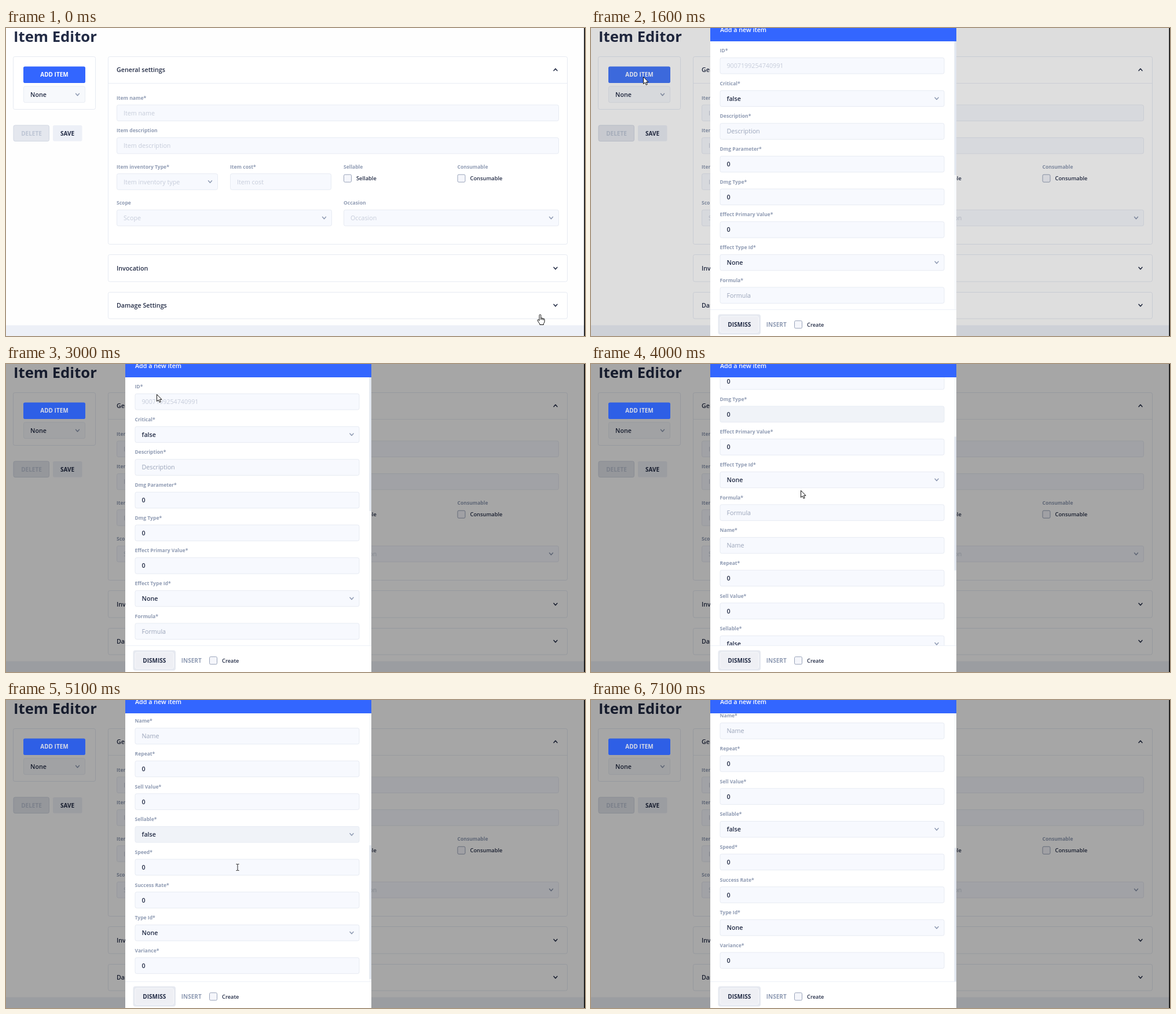
Animation, 1000 px wide and 532 px high, one loop 7200 ms. Source, as an HTML page:

```html
<!DOCTYPE html>
<html lang="en">
<head>
<meta charset="utf-8">
<title>Item Editor</title>
<style>
  html, body { margin: 0; width: 100%; height: 100%; overflow: hidden; background: #fefefe; }
  svg { display: block; width: 100%; height: 100%; }
  text { font-family: "Open Sans", "Noto Sans", sans-serif; font-size: 10.71px; fill: #222b45; white-space: pre; }
  .title { font-size: 25.7px; font-weight: 700; }
  .head, .value { font-weight: 600; }
  .label { font-size: 8.57px; font-weight: 700; fill: #8f9bb3; }
  .hint { fill: #9aa4b9; }
  .off { fill: #c6ccda; }
  .btn { font-size: 10px; font-weight: 700; text-anchor: middle; }
  .check { font-size: 9.3px; font-weight: 600; }
</style>
</head>
<body>
<svg id="stage" viewBox="0 0 1000 532" preserveAspectRatio="none">
  <defs><clipPath id="view"><rect x="206" y="23" width="425" height="463"/></clipPath></defs>
</svg>
<script>
const LOOP = 7200, STEP = 100, PITCH = 56.64;
const stage = document.getElementById('stage');

function el(parent, tag, attrs, content) {
  const node = document.createElementNS('http://www.w3.org/2000/svg', tag);
  for (const key in attrs) node.setAttribute(key, attrs[key]);
  if (content) node.textContent = content;
  parent.appendChild(node);
  return node;
}
const group = (parent, attrs = {}) => el(parent, 'g', attrs);
const label = (parent, x, y, cls, content) => el(parent, 'text', { x, y, class: cls }, content);

function box(parent, x, y, width, height, fill, stroke = 'none', rx = 2.8) {
  return el(parent, 'rect', { x, y, width, height, rx, fill, stroke });
}
function chevron(parent, x, y, color, up = false) {
  const d = up ? -1.7 : 1.7;
  el(parent, 'path', {
    d: `M${x - 3} ${y - d}L${x} ${y + d}L${x + 3} ${y - d}`, fill: 'none', stroke: color,
    'stroke-width': 1.5, 'stroke-linecap': 'round', 'stroke-linejoin': 'round'
  });
}
// A labelled input; y is the middle of its box
function field(parent, x, y, width, name, content, cls, select) {
  label(parent, x, y - 23, 'label', name);
  const rect = box(parent, x + .5, y - 13.8, width - 1, 27.6, '#f7f9fe', '#e7ebf3');
  label(parent, x + 12, y + 4, cls, content);
  if (select) chevron(parent, x + width - 13.5, y, '#8f9bb3');
  return rect;
}
function checkbox(parent, x, y, content) {
  box(parent, x + .5, y - 6.5, 13, 13, '#f5f6fb', '#9aa4ba', 2);
  label(parent, x + 22, y + 3.4, 'check', content);
}

// Page
const page = group(stage);
const line = '#e6eaf2';
box(page, 0, 0, 1000, 532, '#fefefe', 'none', 0);
box(page, 0, 513.5, 1000, 19, '#edf0f7', 'none', 0);
label(page, 13, 24, 'title', 'Item Editor');

box(page, 12.5, 49.5, 142, 91, '#fff', line);
box(page, 30.5, 100.7, 106, 28, '#f7f9fc', '#e9edf4');
label(page, 42, 119, 'value', 'None');
chevron(page, 123.5, 115, '#8f9bb3');
box(page, 13, 168, 61.5, 27.5, '#e4e7ee', '#d2d8e3');
label(page, 44, 185.5, 'btn', 'DELETE').style.fill = '#bcc4d4';
box(page, 81, 168, 50.5, 27.5, '#edf0f7');
label(page, 106, 185.5, 'btn', 'SAVE');

[[49.5, 324, 72, 'General settings'], [391.5, 46.5, 415, 'Invocation'], [456.5, 45.5, 479, 'Damage Settings']]
  .forEach(([y, height, mid, name], i) => {
    box(page, 176.5, y, 793, height, '#fff', line);
    label(page, 191, mid + 4, 'head', name);
    chevron(page, 949, mid, '#222b45', i === 0);
  });
el(page, 'path', { d: 'M177 95.5H969', stroke: '#e9edf4' });

[
  [191, 146.7, 764, 'Item name*', 'Item name'],
  [191, 203.2, 764, 'Item description', 'Item description'],
  [191, 265.5, 175, 'Item inventory Type*', 'Item inventory type', true],
  [387, 265.5, 175, 'Item cost*', 'Item cost'],
  [191, 328, 372, 'Scope', 'Scope', true],
  [583, 328, 372, 'Occasion', 'Occasion', true]
].forEach(([x, y, width, name, hint, select]) => field(page, x, y, width, name, hint, 'off', select));

[[583, 'Sellable'], [779.5, 'Consumable']].forEach(([x, name]) => {
  label(page, x, 242.5, 'label', name);
  checkbox(page, x, 259.7, name);
});

const shade = box(stage, 0, 0, 1000, 532, '#000', 'none', 0);
const addBox = box(stage, 30, 66.5, 107, 28.5, '#36f');
const addText = label(stage, 83.5, 84.2, 'btn', 'ADD ITEM');
box(stage, 998.4, 0, 1.6, 532, '#000', 'none', 0);

// Dialog
const dialog = group(stage);
box(dialog, 206, 0, 425, 532, '#fff', 'none', 0);
box(dialog, 206, 0, 425, 23, '#36f', 'none', 0);
label(dialog, 223, 7, 'head', 'Add a new item').style.fill = '#fff';

const view = group(dialog, { 'clip-path': 'url(#view)' });
const list = group(view);
const fields = [
  ['ID', '9007199254740991', 'off'],
  ['Critical', 'false', 'value', true],
  ['Description', 'Description', 'hint'],
  ['Dmg Parameter', '0'],
  ['Dmg Type', '0'],
  ['Effect Primary Value', '0'],
  ['Effect Type Id', 'None', 'value', true],
  ['Formula', 'Formula', 'hint'],
  ['Name', 'Name', 'hint'],
  ['Repeat', '0'],
  ['Sell Value', '0'],
  ['Sellable', 'false', 'value', true],
  ['Speed', '0'],
  ['Success Rate', '0'],
  ['Type Id', 'None', 'value', true],
  ['Variance', '0']
].map(([name, content, cls = 'value', select], i) =>
  field(list, 222.5, 65.2 + i * PITCH, 388, name + '*', content, cls, select));
box(view, 627.5, 23, 3.5, 463, '#f7f9fc', 'none', 0);
const thumb = box(view, 627.5, 23, 3.5, 231, '#e2e7f0', 'none', 0);

el(dialog, 'path', { d: 'M206 486.5H631', stroke: '#edf1f7' });
box(dialog, 219.5, 494.5, 73.5, 35, '#e6e9f0', 'none', 4);
box(dialog, 223, 498, 66.5, 28, '#eeeff4', '#f7f8fb');
label(dialog, 256.3, 515.8, 'btn', 'DISMISS');
label(dialog, 320.3, 515.8, 'btn', 'INSERT').style.fill = '#8f9bb3';
checkbox(dialog, 351, 512.2, 'Create');

// Cursors, each with its hot spot at 0,0
const pointer = group(stage);
const ink = { fill: '#fff', stroke: '#111', 'stroke-width': 1, 'stroke-linejoin': 'round' };
const cursors = {
  hand: el(pointer, 'path', {
    ...ink,
    d: 'M-1.4 1.2Q-1.4 0 0 0T1.4 1.2V6.2Q2.6 5.2 3.6 6.5Q5 5.8 5.7 7.1Q7.6 6.7 7.6 8.6V12Q7.6 14 6 15.5V17.5H-.6V16' +
       'Q-2.5 14-4 11Q-5 9.2-3.8 8.7Q-2.7 8.3-1.4 10.4ZM1.4 6.2V9M3.6 6.5V9.3M5.7 7.1V9.6'
  }),
  arrow: el(pointer, 'path', { ...ink, d: 'M0 0V12L2.8 9.5L4.7 13.8L6.7 12.9L4.8 8.8H8.5Z' }),
  beam: el(pointer, 'path', {
    fill: 'none', stroke: '#222', d: 'M-2.5-5.5H-.7L0-4.8L.7-5.5H2.5M0-5V5M-2.5 5.5H-.7L0 4.8L.7 5.5H2.5'
  })
};

// Timing tables: [ms, value...]
const path = [
  [0, 922.5, 495], [100, 922.5, 495], [900, 96.5, 92.5], [1200, 96.5, 92.5], [1600, 90.5, 84.5],
  [1900, 90.5, 84.5], [2700, 260.5, 52.5], [3050, 260.5, 52.5], [3500, 362.5, 218.5], [4100, 362.5, 218.5],
  [4700, 400, 289], [5300, 400, 289], [5700, 585, 500], [6200, 636, 540]
];
const scrolling = [[3400, 0], [3700, 73], [4000, 205], [4400, 310], [4800, 399], [5100, 456], [5200, 465]];
const shading = [[1500, 0], [1700, .26], [1900, .35]];
const kinds = [[0, 'hand'], [200, 'arrow'], [900, 'hand'], [1600, 'arrow'], [4600, 'beam'], [5500, 'arrow']];
const hovers = [[0, -1], [3600, 4], [4300, -1], [4700, 11], [5200, 12], [5400, -1]];
const buttons = [
  [0, '#3366ff', '#fff'], [900, '#4f82ff', '#fff'], [1600, '#3c69dc', '#dfe2ea'], [2000, '#2e5fe6', '#d6dae6']
];

const linear = p => p;
const smooth = p => p * p * (3 - 2 * p);

function sample(track, t, ease = linear) {
  const next = track.findIndex(key => key[0] > t);
  if (next < 0) return track[track.length - 1].slice(1);
  if (next === 0) return track[0].slice(1);
  const a = track[next - 1], b = track[next];
  const p = ease((t - a[0]) / (b[0] - a[0]));
  return a.slice(1).map((v, i) => v + (b[i + 1] - v) * p);
}
const current = (track, t) => track.filter(key => key[0] <= t).pop().slice(1);

function draw(t) {
  const [x, y] = sample(path, t, smooth);
  const [scroll] = sample(scrolling, t);
  const [kind] = current(kinds, t);
  const [hover] = current(hovers, t);
  const [fill, ink] = current(buttons, t);

  pointer.setAttribute('transform', `translate(${x} ${y})`);
  for (const name in cursors) cursors[name].style.display = name === kind ? '' : 'none';
  shade.setAttribute('fill-opacity', sample(shading, t)[0]);
  addBox.setAttribute('fill', fill);
  addText.style.fill = ink;
  dialog.style.display = t >= 1600 ? '' : 'none';
  list.setAttribute('transform', `translate(0 ${-scroll})`);
  thumb.setAttribute('y', 23 + scroll / 2);
  fields.forEach((rect, i) => rect.setAttribute('fill', i === hover ? '#f0f3f8' : '#f7f9fe'));
}

const start = performance.now();
function tick() {
  const t = (performance.now() - start) % LOOP;
  draw(Math.floor(t / STEP) * STEP);
  requestAnimationFrame(tick);
}
tick();
</script>
</body>
</html>
```
